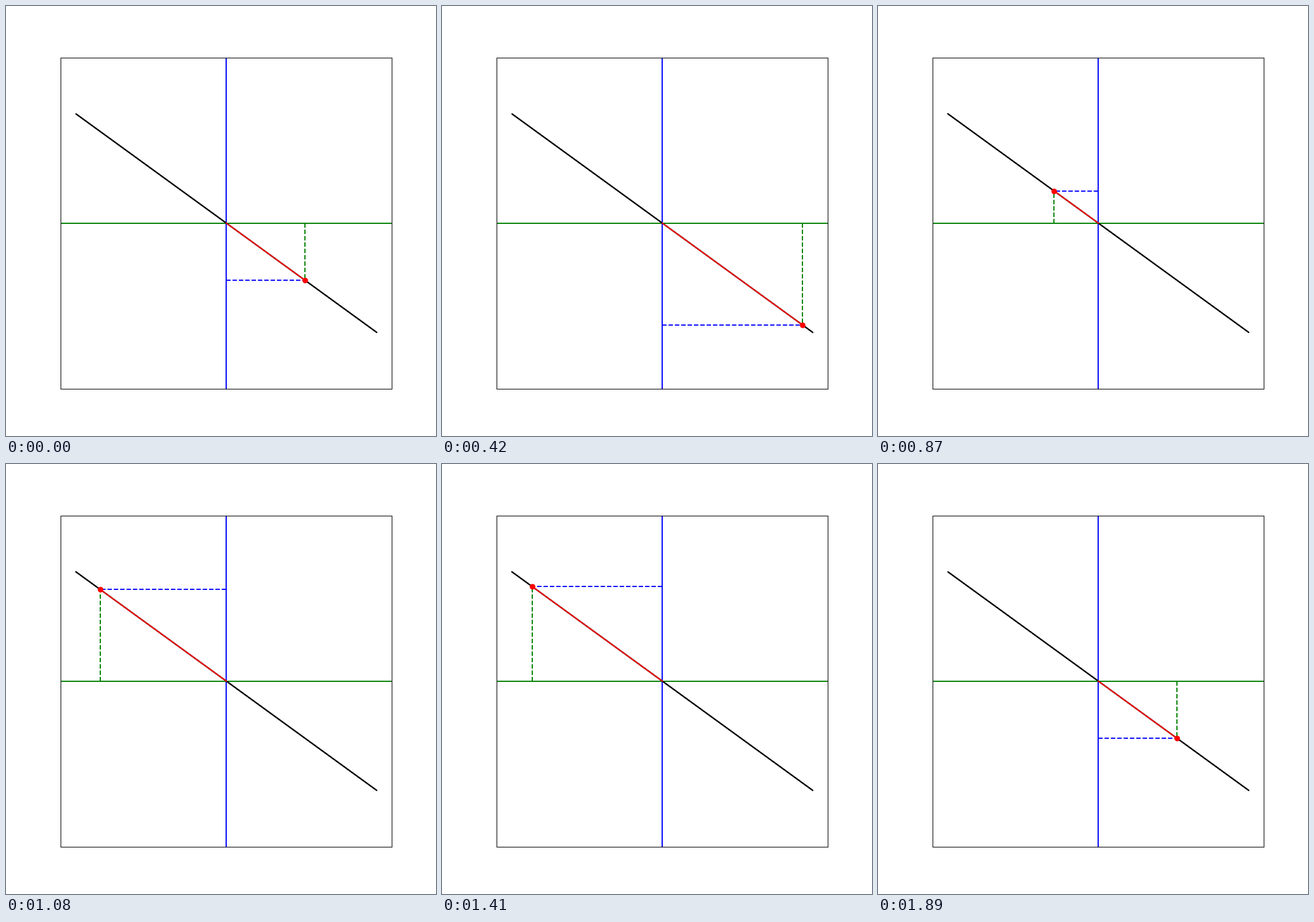
A matplotlib script for the animation above (1.92 s loop, 748x748 px).

```python
import numpy as np
import matplotlib.pyplot as plt
from matplotlib.animation import FuncAnimation

FRAMES = 64
LIMIT = 1.1
PHASE = np.radians(31.4)
AMP_Y = np.tan(np.radians(36))

fig, ax = plt.subplots(figsize=(7.48, 7.48), dpi=100)
ax.set_aspect("equal")
ax.set(xlim=(-LIMIT, LIMIT), ylim=(-LIMIT, LIMIT), xticks=[], yticks=[])

ax.axhline(0, color="green")
ax.axvline(0, color="blue")
trace, = ax.plot([], [], color="black")
drop_x, = ax.plot([], [], "--", color="green")
drop_y, = ax.plot([], [], "--", color="blue")
vector, = ax.plot([], [], color="red")
tip, = ax.plot([], [], "o", color="red")

cycle = np.linspace(0, 2 * np.pi, 100)


def field(angle):
    """Linearly polarised oscillation."""
    return np.sin(angle), -AMP_Y * np.sin(angle)


def update(i):
    angle = PHASE + 2 * np.pi * i / (FRAMES - 1)
    x, y = field(angle)
    trace.set_data(*field(angle + cycle))
    drop_x.set_data([x, x], [0, y])
    drop_y.set_data([0, x], [y, y])
    vector.set_data([0, x], [0, y])
    tip.set_data([x], [y])
    return trace, drop_x, drop_y, vector, tip


anim = FuncAnimation(fig, update, frames=FRAMES, interval=30,
                     repeat=True, repeat_delay=0)
plt.show()
```
